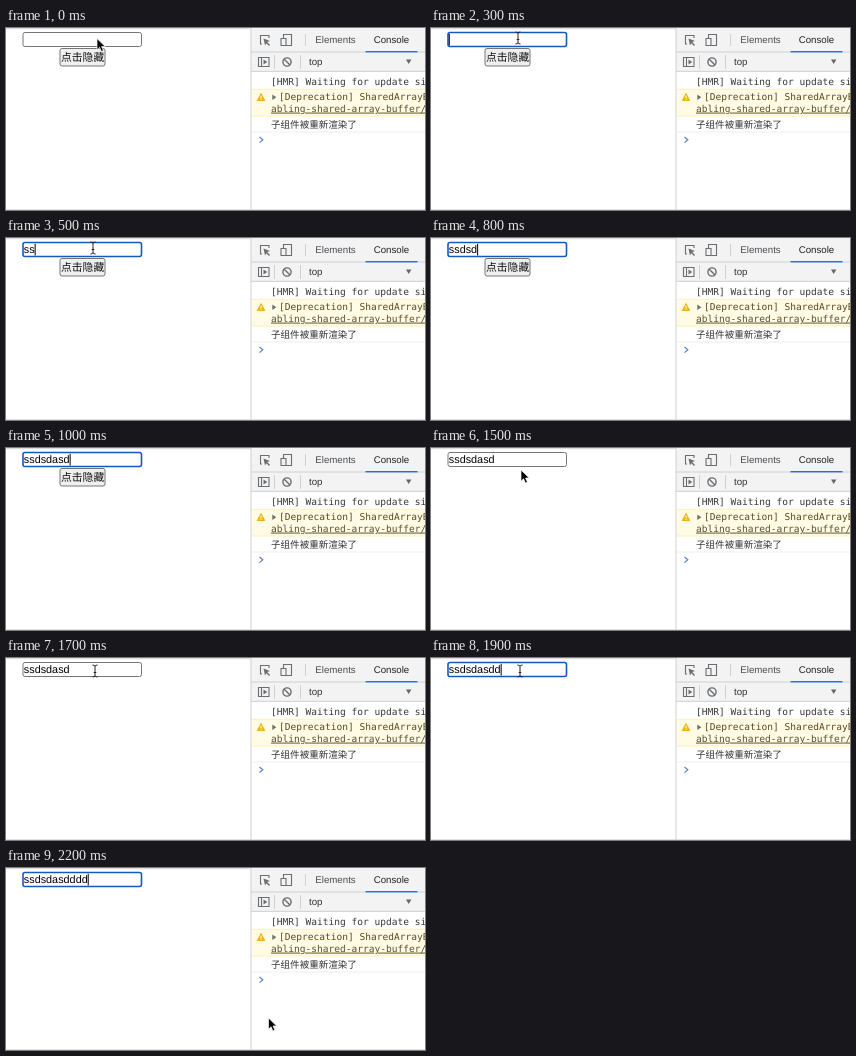
These frames come from a looping animation (419 px wide and 182 px high, 2.3 s). An HTML page:

```html
<!DOCTYPE html>
<html lang="zh">
<head>
<meta charset="utf-8">
<style>
  html, body { margin: 0; width: 100%; height: 100%; overflow: hidden; background: #fff; }
  svg { display: block; width: 419px; height: 182px; }
  text { white-space: pre; text-rendering: geometricPrecision; }
  .ui { font-family: "Liberation Sans", Arial, sans-serif; }
  .cjk { font-family: "Noto Sans CJK SC", "Noto Sans CJK", sans-serif; }
  .mono { font: 9.55px "DejaVu Sans Mono", monospace; }
  .icon { fill: none; stroke: #6a6d71; stroke-width: 1.1; }
</style>
</head>
<body>
<svg viewBox="0 0 419 182">
  <rect width="419" height="182" fill="#fff"/>
  <rect width="245" height="1.2" fill="#dcdcdc"/>
  <rect y="181" width="419" height="1" fill="#e2e2e2"/>

  <!-- developer tools -->
  <rect x="245" width="174" height="44" fill="#f3f3f3"/>
  <path d="M245 0V182M245 24H419M245 43.3H419M299.5 6V18M268.5 27V41M294.5 27V41" fill="none" stroke="#d0d0d0"/>
  <rect x="359.5" y="23" width="52" height="1.4" fill="#1a73e8"/>
  <g class="icon">
    <path d="M256 16H254.5V7.5H263V10"/>
    <path d="M257.5 10.5L264 13L261.2 14L264 17L263 18L260.3 15.2L259 17.5Z" fill="#6a6d71" stroke="none"/>
    <path d="M277.5 10V6.5H285.5V17.5H280.5M275 10.5H280V17.5H275Z"/>
    <path d="M252.5 29.5H263V38.5H252.5ZM255.5 29.5V38.5"/>
    <path d="M257.5 31.5L261.3 34L257.5 36.5Z" fill="#6a6d71" stroke="none"/>
    <circle cx="281" cy="34" r="4.1" stroke-width="1.4"/>
    <path d="M278.2 31.2L283.8 36.8" stroke-width="1.4"/>
  </g>
  <g class="ui" font-size="9.7">
    <text x="309.3" y="15.2" fill="#4a4d51">Elements</text>
    <text x="367.7" y="15.2" fill="#222">Console</text>
    <text x="303" y="36.8" fill="#333">top</text>
  </g>
  <path d="M400 31.5H405.4L402.7 36Z" fill="#666"/>

  <rect x="246" y="61.5" width="173" height="26.5" fill="#fffbe5"/>
  <path d="M246 61.3H419M246 88H419" stroke="#fff0b8"/>
  <path d="M246 104H419" stroke="#eeeeee"/>
  <path d="M255 65.5L258.7 72.5H251.3Z" fill="#f4bd00" stroke="#e5a900" stroke-width=".8" stroke-linejoin="round"/>
  <path d="M255 67.5V70M255 70.8V71.7" stroke="#fff" stroke-width="1"/>
  <path d="M266.3 66.5L270.3 69.2L266.3 72Z" fill="#6e6e6e"/>
  <g class="mono">
    <text x="265" y="56.8" fill="#383838">[HMR] Waiting for update si</text>
    <text x="273" y="72.4" fill="#5c4a20">[Deprecation] SharedArrayBuffer</text>
    <text x="265" y="83.6" fill="#5c5030" text-decoration="underline">abling-shared-array-buffer/</text>
  </g>
  <text class="cjk" x="265" y="100.2" font-size="9.55" fill="#303030">子组件被重新渲染了</text>
  <path d="M253.5 109L256.8 111.8L253.5 114.6" fill="none" stroke="#5a83c4" stroke-width="1.2"/>

  <!-- page -->
  <rect id="field" x="17" y="4.5" width="118.5" height="14" rx="2" fill="#fff"/>
  <text id="value" class="ui" x="17.8" y="15.3" font-size="10.85"/>
  <rect id="caret" y="5.8" width="1" height="11.7" fill="#000"/>
  <g id="button">
    <rect id="edge" x="54" y="20.5" width="45" height="17.5" rx="2"/>
    <text class="cjk" x="55" y="33.2" font-size="10.8" fill="#111">点击隐藏</text>
  </g>

  <circle id="ring" r="17" fill="#fff" fill-opacity=".12" stroke="#111" stroke-width="1.2"/>
  <path id="arrow" d="M0 0V11.2L2.6 8.8L4.4 13L6.4 12.1L4.6 8H8.2Z" fill="#000" stroke="#fff" stroke-width=".7"/>
  <path id="beam" d="M-2.5 -6Q0 -6 0 -4.5Q0 -6 2.5 -6M0 -4.5V4.5M-2.5 6Q0 6 0 4.5Q0 6 2.5 6M-1.3 1.5H1.3" fill="none" stroke="#222" stroke-width="1"/>
</svg>
<script>
const $ = id => document.getElementById(id);
const LOOP = 2300, STEP = 100;
const typed = "ssdsdasdddd";
const keyTimes = [400, 500, 600, 700, 800, 900, 900, 1000, 1900, 2000, 2100];

// start time, pointer shape, x, y
const pointer = [
  [0, "arrow", 91, 10.5], [100, "beam", 87, 10], [600, ""],
  [1100, "arrow", 90, 22], [1200, "arrow", 90, 27],
  [1500, "arrow", 90, 22], [1600, "beam", 89, 13],
  [2000, ""], [2100, "arrow", 190, 92], [2200, "arrow", 262.5, 150]
];

const show = (id, on) => $(id).style.display = on ? "" : "none";
const within = (t, from, to) => t >= from && t < to;
const place = (id, x, y) => $(id).setAttribute("transform", `translate(${x} ${y})`);

function paint(id, attributes) {
  for (const [name, value] of Object.entries(attributes)) $(id).setAttribute(name, value);
}

function draw(now) {
  const t = Math.floor(now % LOOP / STEP) * STEP;
  const focused = within(t, 200, 1300) || t >= 1800;
  const pressed = t === 1300;

  $("value").textContent = typed.slice(0, keyTimes.filter(k => k <= t).length);
  paint("field", focused
    ? { stroke: "#1659bd", "stroke-width": 1.6 }
    : { stroke: "#767676", "stroke-width": 1 });
  paint("caret", { x: 17.8 + $("value").getComputedTextLength() });
  show("caret", focused);

  show("button", t < 1400);
  paint("edge", pressed
    ? { stroke: "#b5b5b5", fill: "#f5f5f5" }
    : { stroke: "#767676", fill: "#efefef" });

  const [, shape, x, y] = pointer.filter(p => p[0] <= t).pop();
  for (const id of ["arrow", "beam"]) show(id, id === shape);
  show("ring", t === 200 || pressed);
  if (shape) {
    place(shape, x, y);
    place("ring", x - 0.7, y + 0.8);
  }
}

let start;
function tick(now) {
  start ??= now;
  draw(now - start);
  requestAnimationFrame(tick);
}
draw(0);
requestAnimationFrame(tick);
</script>
</body>
</html>
```
